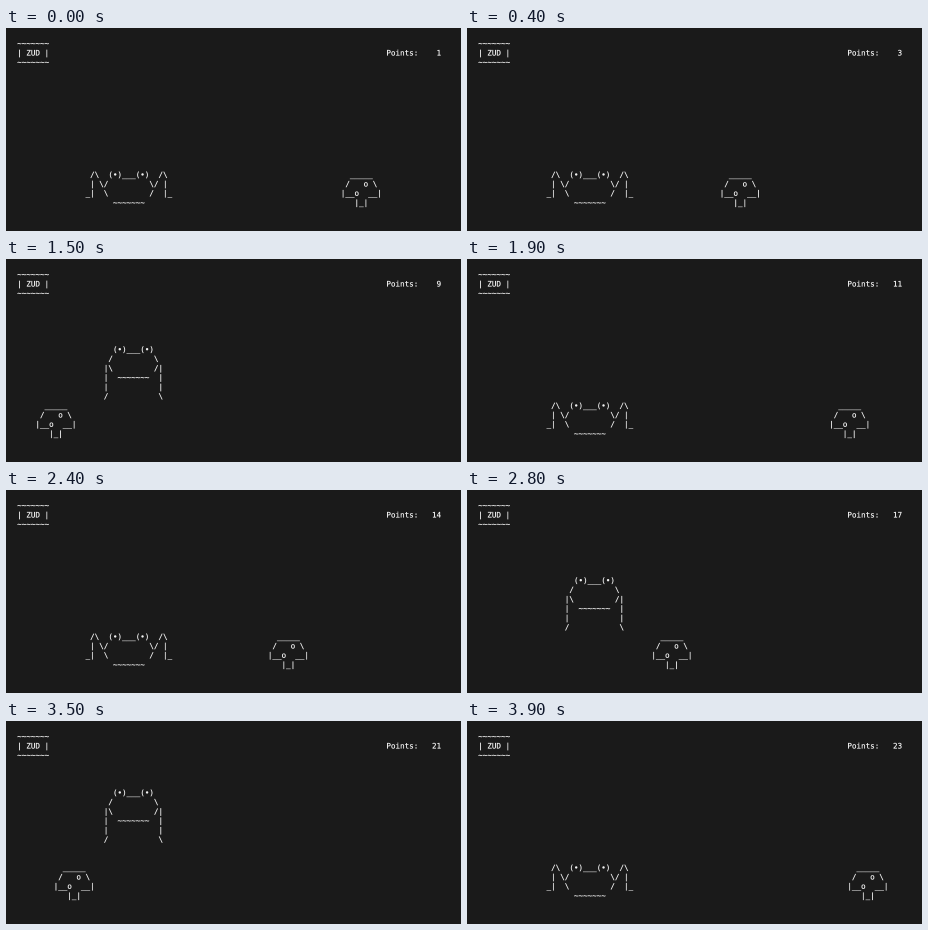
Animation of 455 by 203 pixels, one loop 4000 ms. Source, as an HTML page with a canvas:

```html
<!DOCTYPE html>
<html lang="en">
<head>
<meta charset="utf-8">
<title>Frog jump</title>
<style>
  html, body { margin: 0; width: 100%; height: 100%; overflow: hidden; background: #1a1a1a; }
  canvas { display: block; width: 455px; height: 203px; }
</style>
</head>
<body>
<canvas id="stage"></canvas>
<script>
const WIDTH = 455, HEIGHT = 203, LOOP = 4000, STEP = 100;
const CELL_W = 4.558, CELL_H = 9.36, LEFT = 11.2, BASELINE = 18.1;
const GROUND_ROW = 14, DETAIL = 4;

const SIGN = [
  '~~~~~~~',
  '| ZUD |',
  '~~~~~~~',
];
const FROG_SITTING = [
  ' /\\  (•)___(•)  /\\',
  ' | \\/         \\/ |',
  '_|  \\         /  |_',
  '      ~~~~~~~',
];
const FROG_JUMPING = [
  '  (•)___(•)',
  ' /         \\',
  '|\\         /|',
  '|  ~~~~~~~  |',
  '|           |',
  '/           \\',
];
const MUSHROOM = [
  '  _____',
  ' /   o \\',
  '|__o  __|',
  '   |_|',
];

// Each pass is a list of [time, column]; the mushroom re-enters on the right.
const PASSES = [
  [[0, 71], [400, 53], [900, 31], [1200, 18], [1500, 4], [1700, -5]],
  [[1800, 81], [2400, 55], [3100, 26], [3600, 4], [3800, -5]],
  [[3900, 81], [4000, 77]],
];
const JUMPS = [
  { start: 600, apex: 1115, end: 1700 },
  { start: 2600, apex: 3195, end: 3800 },
];
const APEX_ROW = -1, ROW_TIME = 43;

function setUp(canvas, scale) {
  canvas.width = Math.round(WIDTH * scale);
  canvas.height = Math.round(HEIGHT * scale);
  const context = canvas.getContext('2d');
  context.scale(scale, scale);
  return context;
}

// Text is drawn enlarged and scaled down, so rows keep their fractional positions.
const buffer = document.createElement('canvas');
const ctx = setUp(buffer, DETAIL);
ctx.font = '7.57px "DejaVu Sans Mono", monospace';
ctx.lineWidth = 0.2;
ctx.lineJoin = 'round';
const stage = setUp(document.getElementById('stage'), window.devicePixelRatio || 1);
stage.imageSmoothingQuality = 'high';

function drawText(lines, col, row) {
  lines.forEach((line, r) => {
    [...line].forEach((char, c) => {
      if (char === ' ') return;
      const x = LEFT + (col + c) * CELL_W, y = BASELINE + (row + r) * CELL_H;
      ctx.fillText(char, x, y);
      ctx.strokeText(char, x, y);
    });
  });
}

function mushroomColumn(time) {
  const pass = PASSES.filter(p => p[0][0] <= time).pop();
  let i = 1;
  while (i < pass.length - 1 && pass[i][0] < time) i++;
  const [t0, c0] = pass[i - 1], [t1, c1] = pass[i];
  return Math.round(c0 + (c1 - c0) * (time - t0) / (t1 - t0));
}

function drawFrog(time) {
  const jump = JUMPS.find(j => time >= j.start && time < j.end);
  if (!jump) {
    drawText(FROG_SITTING, 15, GROUND_ROW);
    return;
  }
  const rise = Math.round(Math.abs(time - jump.apex) / ROW_TIME);
  drawText(FROG_JUMPING, 19, Math.min(12, APEX_ROW + rise));
}

function draw(time) {
  const points = Math.floor(1.3 + time * 0.00563);
  ctx.fillStyle = '#1a1a1a';
  ctx.fillRect(0, 0, WIDTH, HEIGHT);
  ctx.fillStyle = ctx.strokeStyle = '#f2f2f2';
  drawText(SIGN, 0, 0);
  drawText(['Points:' + String(points).padStart(5)], 81, 1);
  drawFrog(time);
  drawText(MUSHROOM, mushroomColumn(time), GROUND_ROW);
  stage.drawImage(buffer, 0, 0, WIDTH, HEIGHT);
}

const begin = performance.now();
function tick() {
  const time = (performance.now() - begin) % LOOP;
  draw(Math.floor(time / STEP) * STEP);
  requestAnimationFrame(tick);
}
tick();
</script>
</body>
</html>
```
